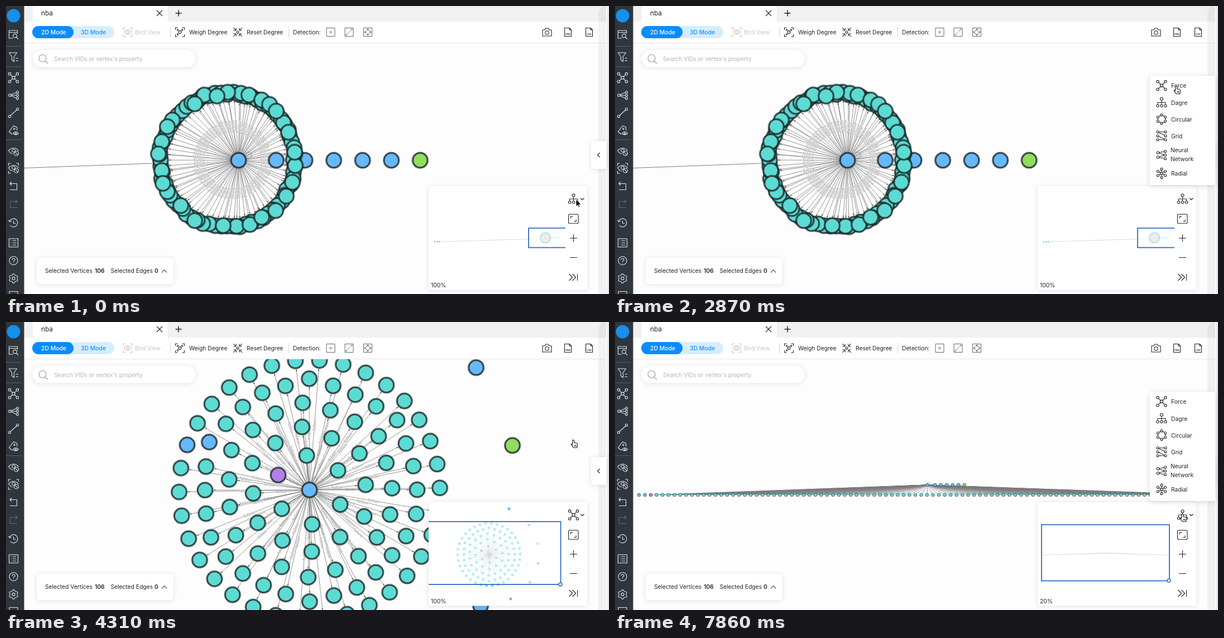
Recreate the animation shown at these times as an HTML page. Size 1080 px wide and 518 px high, loop 8000 ms.

```html
<!DOCTYPE html>
<html lang="en">
<head>
<meta charset="utf-8">
<title>Graph layouts</title>
<style>
html, body { margin: 0; width: 100%; height: 100%; overflow: hidden; background: #fff; }
svg { display: block; width: 1080px; height: 518px; font: 10.25px Inter, "Open Sans", sans-serif; fill: #222; }
.ic { fill: none; stroke: #222; stroke-width: 1.1; stroke-linejoin: round; }
.thin { stroke: #555; stroke-width: .9; }
.side .ic { stroke: #e3e6e8; }
.side .dim { stroke: #646b72; }
.off { fill: #c4c4c4; }
.off .ic { stroke: #c4c4c4; }
.edge { stroke: #7c7c7c; stroke-width: .8; fill: none; }
.tag { font-size: 7.4px; fill: #8c8c8c; text-anchor: middle; paint-order: stroke; stroke: #fdfdfd; stroke-width: 1.2px; }
.card { fill: #fff; filter: drop-shadow(0 1px 4px rgba(0,0,0,.11)); }
.view { fill: rgba(255,255,255,.55); stroke: #2f6bc4; stroke-width: 1.8; }
.anim { animation: 8s step-end -10ms infinite; }
#g1 { animation-name: first; }
#m1 { animation-name: firstMap; }
#g2, #m2 { animation-name: second; }
#g3, #m3 { animation-name: third; }
#layoutDagre { animation-name: dagre; }
#layoutForce { animation-name: force; }
#menu { animation-name: menu; }
#arrow { animation-name: arrow; }
#hand { animation-name: hand; }
@keyframes first { 0% { opacity: 1 } 42.625%, 100% { opacity: 0 } }
@keyframes firstMap { 0% { opacity: 1 } 44.875%, 100% { opacity: 0 } }
@keyframes second { 0% { opacity: 0 } 44.875% { opacity: 1 } 80.5%, 100% { opacity: 0 } }
@keyframes third { 0% { opacity: 0 } 80.5%, 100% { opacity: 1 } }
@keyframes dagre { 0% { opacity: 1 } 42.625% { opacity: 0 } 80.5%, 100% { opacity: 1 } }
@keyframes force { 0% { opacity: 0 } 42.625% { opacity: 1 } 80.5%, 100% { opacity: 0 } }
@keyframes arrow { 0% { opacity: 1 } 13.5%, 100% { opacity: 0 } }
@keyframes menu {
  0% { opacity: 0 } 22.5% { opacity: .55 } 24.75% { opacity: 1 } 44.875% { opacity: .12 } 47.125% { opacity: 0 }
  67.125% { opacity: .55 } 69.375% { opacity: 1 } 80.5% { opacity: 0 } 96% { opacity: .55 } 98.25%, 100% { opacity: 1 }
}
@keyframes hand {
  0% { opacity: 0; transform: translate(1018px,352px) }
  18% { opacity: 1; transform: translate(1018px,352px) }
  27% { opacity: 1; transform: translate(1018px,305px) }
  29.25% { opacity: 1; transform: translate(1014px,230px) }
  31.375% { opacity: 1; transform: translate(1009px,172px) }
  33.625% { opacity: 1; transform: translate(1007px,152px) }
  35.875% { opacity: 1; transform: translate(1007px,151px) }
  53.875% { opacity: 1; transform: translate(1018px,219px) }
  56.125% { opacity: 1; transform: translate(1029px,262px) }
  58.375% { opacity: 1; transform: translate(1031px,300px) }
  60.5% { opacity: 1; transform: translate(1027px,330px) }
  62.75% { opacity: 1; transform: translate(1020px,348px) }
  65% { opacity: 1; transform: translate(1018px,352px) }
  69.375% { opacity: 1; transform: translate(1014px,290px) }
  71.5% { opacity: 1; transform: translate(1004px,208px) }
  73.75% { opacity: 1; transform: translate(1001px,183px) }
  82.75% { opacity: 1; transform: translate(1006px,202px) }
  85% { opacity: 1; transform: translate(1014px,250px) }
  87.125% { opacity: 1; transform: translate(1018px,302px) }
  89.375% { opacity: 1; transform: translate(1019px,340px) }
  91.5%, 100% { opacity: 1; transform: translate(1018px,352px) }
}
</style>
</head>
<body>
<svg viewBox="0 0 1080 518">
  <defs>
    <g id="node">
      <circle r="16" fill="#000" fill-opacity=".13"/>
      <circle r="13.2" stroke="#1c2b2c" stroke-opacity=".82" stroke-width="3"/>
    </g>
    <marker id="tip" markerUnits="userSpaceOnUse" markerWidth="5" markerHeight="3" refX="4" refY="1.5" orient="auto">
      <path d="M0 0L5 1.500L0 3Z" fill="#777"/>
    </marker>
    <clipPath id="canvas"><path d="M32 66H1080V518H32Z"/></clipPath>
    <clipPath id="map"><path d="M757 324H1002V510H757Z"/></clipPath>
  </defs>
  <path fill="#fdfdfd" d="M0 0H1080V518H0Z"/>

  <g clip-path="url(#canvas)">
    <g id="g1" class="anim"></g>
    <g id="g2" class="anim"></g>
    <g id="g3" class="anim"></g>
  </g>

  <!-- tabs and toolbar -->
  <path fill="#f1f1f1" d="M32 0H1080V28H32Z"/>
  <path fill="#fff" d="M32 28H1080V66H32ZM48 0H290V28H48Z"/>
  <path stroke="#e6e6e6" d="M32 66.5H1080M290.5 0V28"/>
  <text x="63" y="17" font-size="11.7">nba</text>
  <path class="ic" d="M270 8L280 18M280 8L270 18"/>
  <path class="ic" style="stroke-width:1.5" d="M303.500 13H314.500M309 7.500V18.500"/>
  <rect x="47" y="36" width="147" height="22" rx="11" fill="#d7edff"/>
  <rect x="47" y="36" width="74" height="22" rx="11" fill="#0a8cff"/>
  <g font-size="10.4" font-weight="500" text-anchor="middle">
    <text x="85.500" y="51" fill="#fff">2D Mode</text>
    <text x="156.500" y="51" fill="#1890ff">3D Mode</text>
  </g>
  <g class="off"><g id="bird"></g><text x="231" y="51">Bird View</text></g>
  <path stroke="#d0d0d0" d="M294.500 38V56M506.500 38V56"/>
  <text x="328" y="51">Weigh Degree</text>
  <text x="431" y="51">Reset Degree</text>
  <text x="514" y="51">Detection:</text>
  <g id="tools"></g>
  <g font-size="4" font-weight="700" text-anchor="middle"><text x="1006.500" y="51.500">PNG</text><text x="1044.500" y="51.500">CSV</text></g>

  <!-- search -->
  <rect class="card" x="47.500" y="79" width="292" height="31" rx="15.500"/>
  <path class="ic" style="stroke:#999" d="M59 94a6.500 6.500 0 1 0 13 0a6.500 6.500 0 1 0-13 0M70 99L75 103.500"/>
  <text x="86" y="98.500" fill="#b3b3b3">Search VIDs or vertex's property</text>

  <!-- selection summary -->
  <rect class="card" x="55" y="453" width="245" height="47" rx="6"/>
  <text x="70" y="480">Selected Vertices</text>
  <text x="159" y="480" font-weight="600">106</text>
  <text x="187.500" y="480">Selected Edges</text>
  <text x="266" y="480" font-weight="600">0</text>
  <path class="ic" d="M279 479.500L283.500 474.500L288 479.500"/>

  <!-- right edge -->
  <path fill-opacity=".05" d="M1075 0V518H1061V16Q1061 4 1069 0Z"/>
  <path fill="#fafafa" d="M1075 0H1080V518H1075Z"/>
  <path stroke="#dedede" stroke-width="2" d="M1078.500 0V518"/>
  <path class="card" d="M1075 243H1054Q1048 243 1048 249V287Q1048 293 1054 293H1075Z"/>
  <path class="ic" d="M1063.500 264L1059.500 268L1063.500 272"/>

  <!-- minimap -->
  <rect class="card" x="757" y="324" width="284" height="186.500" rx="3"/>
  <g clip-path="url(#map)">
    <g id="m1" class="anim"></g>
    <g id="m2" class="anim"></g>
    <g id="m3" class="anim"></g>
  </g>
  <g id="layoutDagre" class="anim"></g>
  <g id="layoutForce" class="anim"></g>
  <path class="ic" d="M1029 345.500L1032 348.500L1035.500 345.500"/>
  <path class="ic" d="M1007.500 376.500q0-2 2-2h13.500q2 0 2 2v12.500q0 2-2 2h-13.500q-2 0-2-2zM1011.500 382V378.500H1015M1017.500 387.500H1021V384M1010 417.500H1023M1016.500 411V424M1010 452.500H1023M1008.500 482L1014.500 488L1008.500 494M1014.500 482L1020.500 488L1014.500 494M1023.500 482V494"/>

  <!-- layout menu -->
  <g id="menu" class="anim">
    <rect x="958" y="125.500" width="117" height="196.500" rx="3" fill="#fff" style="filter:drop-shadow(0 2px 5px rgba(0,0,0,.15))"/>
    <g id="items"></g>
  </g>

  <!-- sidebar -->
  <g class="side">
    <path fill="#30363d" d="M0 0H32.500V518H0Z"/>
    <path stroke="#596067" d="M0 72.500H28M0 109.500H28M0 240.500H28"/>
    <circle cx="13.500" cy="17.500" r="12" fill="#168fee"/>
    <g id="side"></g>
  </g>

  <path id="arrow" class="anim" stroke="#fff" stroke-width=".8" fill="#000" d="M1021 348v12.500l3-2.700 2 4.400 2-1-2-4.100h4z"/>
  <g id="hand" class="anim">
    <path fill="#fff" stroke="#111" stroke-width="1.100" stroke-linejoin="round" d="M-2-7Q-.6-7-.4-5.400V-1.800L4-1Q5.800-.6 5.600 1L4.800 5V7H-1.800L-5.400 1.600Q-6 .2-4.600 .2L-3.400 1.500V-5.400Q-3.400-7-2-7ZM.4 2V5M2.500 2V5"/>
  </g>
</svg>
<script>
const put = (id, html) => { document.getElementById(id).innerHTML = html; };
const color = { t: '#5cdbd3', b: '#66b8ff', g: '#92dc60', p: '#b37feb' };
const fix = v => +v.toFixed(2);
const cosDeg = deg => Math.cos(deg * Math.PI / 180);
const polar = (cx, cy, r, deg) => [fix(cx + r * cosDeg(deg - 90)), fix(cy - r * cosDeg(deg))];
let seed = 7;
const rand = () => (seed = seed * 16807 % 2147483647) / 2147483647;

// graph parts: a point is [x, y, kind]
const node = ([x, y, c = 't'], k = 1) =>
  `<use href="#node" fill="${color[c]}" transform="translate(${x} ${y}) scale(${k})"/>`;
const dot = ([x, y, c = 't'], r) => `<circle cx="${x}" cy="${y}" r="${r}" fill="${color[c]}"/>`;
const edge = ([x, y], [px, py], gap) => {
  const k = 1 - gap / Math.hypot(px - x, py - y);
  return `<path class="edge" ${gap > 9 ? 'marker-end="url(#tip)"' : ''} d="M${x} ${y}L${fix(x + (px - x) * k)} ${fix(y + (py - y) * k)}"/>`;
};
const label = ([x, y], [px, py]) => {
  let a = Math.atan2(py - y, px - x) * 180 / Math.PI;
  if (Math.abs(a) > 90) a += 180;
  return `<text class="tag" transform="translate(${fix((x + px) / 2)} ${fix((y + py) / 2)}) rotate(${fix(a)})" y="2.5">follow</text>`;
};
const star = (c, pts) => pts.map(p => edge(c, p, 15) + label(c, p)).join('');
const nodes = (pts, k) => pts.map(p => node(p, k)).join('');
const dots = (pts, r) => pts.map(p => dot(p, r)).join('');
const zoom = n => `<text x="761" y="506" font-size="10.4">${n}%</text>`;
const knob = (x, y) => `<circle cx="${x}" cy="${y}" r="3" fill="#fff" stroke="#2f6bc4" stroke-width="1.500"/>`;

// dense ring
const hub = [416.5, 277.5];
const back = Array.from({ length: 68 }, (_, i) => polar(396.5, 277, 118 + rand() * 5, i * 360 / 68));
const front = [
  [421, 157], [435, 160], [458, 169], [472, 177], [497, 210], [506, 227], [484, 189], [355, 160], [338, 176],
  [397, 155], [378, 162], [298, 205], [289, 217], [279, 244], [273, 266], [279, 296], [289, 334], [281, 319],
  [313, 359], [338, 386], [413, 396], [389, 395], [437, 393], [483, 368], [458, 380], [502, 342], [513, 317],
  [518, 287], [517, 263]
];
const ring = [...back, ...front];
const tail = [0, 1, 2, 3, 4, 5].map(i => [fix(484 + 51.55 * i), 277.5, i < 5 ? 'b' : 'g']);
put('g1', '<path class="edge" style="stroke-width:1.1" d="M32 291.500L262 283"/>' + star(hub, ring) +
  '<path class="edge" d="M424 268Q434 258 439 266T429 275"/>' + nodes(tail) + nodes(ring) + node([...hub, 'b']));
put('m1', '<path stroke="#ccc" stroke-width=".7" d="M779 424L957 418.500"/>' +
  dots([768, 772, 776].map(x => [x, 424, 'b']), 1.2) +
  '<circle cx="966" cy="417" r="9" fill="#e0d6d6" stroke="#72d6cb" stroke-width="3"/>' +
  dots(tail.map((p, i) => [fix(972.5 + 3.8 * i), 417, p[2]]), 1.1) +
  '<rect class="view" x="936" y="399.500" width="80" height="35"/>' + zoom(100));

// concentric rings: first angle, angular sway, radii
const core = [543.5, 302];
const shells = [
  [-4.5, 0, [62, 62, 61, 62, 60, 62]],
  [-4.4, -2.4, [114, 101, 111, 101, 109, 101, 111, 103, 110, 101, 113, 104]],
  [-6.5, 2.2, [157, 148, 147, 157, 146, 148, 151, 148, 148, 151, 157, 147, 147, 155, 146, 145, 157, 148, 150]],
  [-.1, 0, [200, 192, 190, 192, 201, 192, 191, 193, 196, 192, 189, 190, 195, 195, 201, 192, 190, 192, 192, 196, 190, 187, 190, 199, 191, 191, 194, 192]],
  [4.4, 0, Array(34).fill(233.5)]
];
const kinds = { '0,5': 'p', '3,23': 'b', '4,27': 'b' };
const web = shells.flatMap(([start, sway, radii], s) => radii.map((r, i) => {
  const a = i * 360 / radii.length;
  return [...polar(...core, r, start + a + sway * cosDeg(a - 20)), kinds[[s, i]]];
}));
const loose = [[842, 82, 'b'], [907, 222, 'g'], [850, 510, 'b'], [910, 369, 'b'], [693, -40, 'b'], [705, 635, 'b']];
const linked = web.filter(p => p[2] !== 'b');
const all = [...web, ...loose, [...core, 'b']];
put('g2', star(core, linked) + '<path class="edge" d="M548 288Q552 274 556 280T551 292"/>' + nodes(all));
put('m2', '<g transform="translate(865 418) scale(.24) translate(-543.5 -302)">' +
  linked.map(p => edge(core, p, 0)).join('') + dots(all, 10.5) + '</g>' +
  '<rect class="view" x="740" y="359" width="253.500" height="113"/>' + knob(993, 472) + zoom(100));

// two level tree
const root = [559.5, 293, 'b'];
const row = Array.from({ length: 99 }, (_, i) => [fix(43 + 10.53 * i), 311, 'bbp'[i]]);
const top3 = [root, ...[0, 1, 2, 3, 4, 5].map(i => [fix(573 + 10.55 * i), 293, i < 5 ? 'b' : 'g'])];
put('g3', row.slice(2).map(p => edge(root, p, 3)).join('') +
  '<circle cx="562" cy="290" r="2.500" fill="none" stroke="#bbb" stroke-width=".8"/>' + nodes(row, .215) + nodes(top3, .215));
put('m3', '<path fill="#d5d5d5" stroke="#ccc" stroke-width=".5" d="M765 419L880 415L993 419L880 416.500Z"/>' +
  '<rect class="view" style="fill:rgba(255,255,255,.3)" x="764" y="364.500" width="229" height="101"/>' + knob(992, 465) + zoom(20));

// icons, each drawn around its own centre
const o = (x, y, r = 2.2) => `M${x - r} ${y}a${r} ${r} 0 1 0 ${2 * r} 0a${r} ${r} 0 1 0 ${-2 * r} 0`;
const around = (n, f) => Array.from({ length: n }, (_, i) => f(i * 360 / n)).join('');
const diagonals = f => [45, 135, 225, 315].map(f).join('');
const ray = (a, r1, r2) => `M${polar(0, 0, r1, a)}L${polar(0, 0, r2, a)}`;
const box = (w, h) => `M${-w} ${-h}H${w}V${h}H${-w}Z`;
const corners = 'M-8-4V-8H-4M4-8H8V-4M8 4V8H4M-4 8H-8V4';
const eye = 'M-9-1Q0-10 9-1M-9-1Q-5 5-1 5' + o(0, -1, 2.8) + o(5, 4, 4) + 'M2.3 1.300L7.700 6.700';
const art = {
  force: o(0, 0, 2.6) + diagonals(a => o(...polar(0, 0, 9.8, a)) + ray(a, 2.6, 7.6)),
  dagre: o(0, -6.5, 2.5) + o(-7, 6) + o(0, 6) + o(7, 6) + 'M0-4V3.800M-7 3.800V0H7V3.800',
  circular: around(6, a => o(...polar(0, 0, 7.6, a), 2) + `M${polar(0, 0, 7, a + 17)}L${polar(0, 0, 7, a + 43)}`),
  grid: [-7, 0, 7].map(y => o(-7, y, 2) + o(7, y, 2)).join('') + 'M-5-7H5M-5 7H5M-5.400-6L5.400-1M-5.400 1L5.400 6',
  neural: o(-6.5, -4) + o(-6.5, 4) + o(6.5, -6.5, 2) + o(6.5, 0, 2) + o(6.5, 6.5, 2) + 'M-4.400-4.500L4.500-6M-4.500-3.300L4.600-.5M-4.500 3.300L4.600 .5M-4.400 4.500L4.500 6',
  radial: o(0, 0, 2.4) + around(6, a => o(...polar(0, 0, 7.6, a), 2) + ray(a, 2.4, 5.6)),
  find: 'M7-1V-7H-8V7H-1M-8-3.500H7' + o(2.5, 2.5, 3.4) + 'M5 5L8.500 8.500',
  filter: 'M-8-8H6L1-1V8L-3 5V-1ZM4 2H8.500M4 6.500H8.500',
  branch: o(-6.5, 0) + o(7, -5.5, 2) + o(7, 0, 2) + o(7, 5.5, 2) + 'M-4.300 0H5M-4.500-1L5.100-5M-4.500 1L5.100 5',
  line: o(-7, 6.5, 2) + o(7, -6.5, 2) + 'M-5.500 5L5.500-5',
  tag: 'M-2 7L-8 2L0-8.500L6-6L6.500 0' + o(1.5, -3, 1.2) + 'M-1 5Q4-.5 9 5Q4 10-1 5' + o(4, 5, 1.2),
  eye,
  frame: eye + 'M-9-5V-9H-5M5-9H9V-5M-9 5V9H-5',
  undo: 'M-6.500-4.500H6V6.500H-6.500M-3.500-7.500L-6.500-4.500L-3.500-1.500',
  redo: 'M6.500-4.500H-6V6.500H6.500M3.500-7.500L6.500-4.500L3.500-1.500',
  history: 'M-7-3A7.500 7.500 0 1 1-6 4.500M-9-5L-7-2L-3.500-3.500M0-4V1H4',
  list: box(8, 7.5) + 'M-2-4H5M-2 0H5M-2 4H5M-5-4H-4M-5 0H-4M-5 4H-4',
  help: o(0, 0, 7.5) + 'M-2.500-1.500Q-2.500-4 0-4T2.500-1.500Q2.500 0 0 1V2M0 3.500V4.500',
  gear: o(0, 0, 2.6) + 'M' + Array.from({ length: 24 }, (_, i) => polar(0, 0, i % 4 < 2 ? 8.2 : 6.6, i * 15 - 7.5)).join('L') + 'Z',
  bird: 'M-7 0Q0-8 7 0Q0 8-7 0' + o(0, 0, 2.3) + corners,
  weigh: corners + o(0, 0, 2.4) + o(-4, -4, 1.2) + o(4, -4, 1.2) + o(-4, 4, 1.2),
  reset: o(0, 0, 2) + diagonals(a => ray(a, 5, 11) + `M${polar(0, 0, 8, a - 25)}L${polar(0, 0, 4.5, a)}L${polar(0, 0, 8, a + 25)}`),
  single: box(7.5, 7.5) + o(0, 0, 1.6),
  pair: box(7.5, 7.5) + 'M-4 4L-1.500 1.500M-.8 .8L.8-.8M1.500-1.500L4-4' + o(-5, 5, .8) + o(5, -5, .8),
  loop: box(7.5, 7.5) + 'M0-5L5 0L0 5L-5 0Z' + o(0, -5, 1) + o(5, 0, 1) + o(0, 5, 1) + o(-5, 0, 1),
  camera: 'M-8-4H-4L-2.500-7H2.500L4-4H8V7H-8Z' + o(0, 1, 3.2),
  sheet: 'M-6-7.500H2.500L6-4V7.500H-6ZM2.500-7.500V-4H6'
};
const icon = (name, x, y, cls = '') => `<path class="ic ${cls}" transform="translate(${x} ${y})" d="${art[name]}"/>`;
const iconRow = (list, cls) => Object.entries(list).map(([n, x]) => icon(n, x, 47, cls)).join('');

put('bird', icon('bird', 218, 47));
put('tools', iconRow({ weigh: 311.5, reset: 415, camera: 969, sheet: 1006.5 }) + icon('sheet', 1044.5, 47) +
  iconRow({ single: 581.5, pair: 614.5, loop: 648 }, 'thin'));
put('side', Object.entries({
  find: 51, filter: 92, force: 129, branch: 160.5, line: 192, tag: 224, eye: 261, frame: 292,
  undo: 324, redo: 356, history: 390, list: 426, help: 458, gear: 490
}).map(([n, y]) => icon(n, 13.5, y, n === 'redo' ? 'dim' : '')).join('') + '<path class="ic" d="M6 518V513.500H21V518"/>');
put('layoutDagre', icon('dagre', 1016.5, 347));
put('layoutForce', icon('force', 1016.5, 347));
const text = (x, y, s) => `<text x="${x}" y="${y}">${s}</text>`;
put('items', Object.entries({ force: 143, dagre: 173.5, circular: 203.5, grid: 233.5, neural: 268, radial: 301 })
  .map(([n, y]) => icon(n, 979, y) + (n === 'neural'
    ? text(995, 263, 'Neural') + text(995, 279, 'Network')
    : text(996, y + 4, n[0].toUpperCase() + n.slice(1)))).join(''));
</script>
</body>
</html>
```
